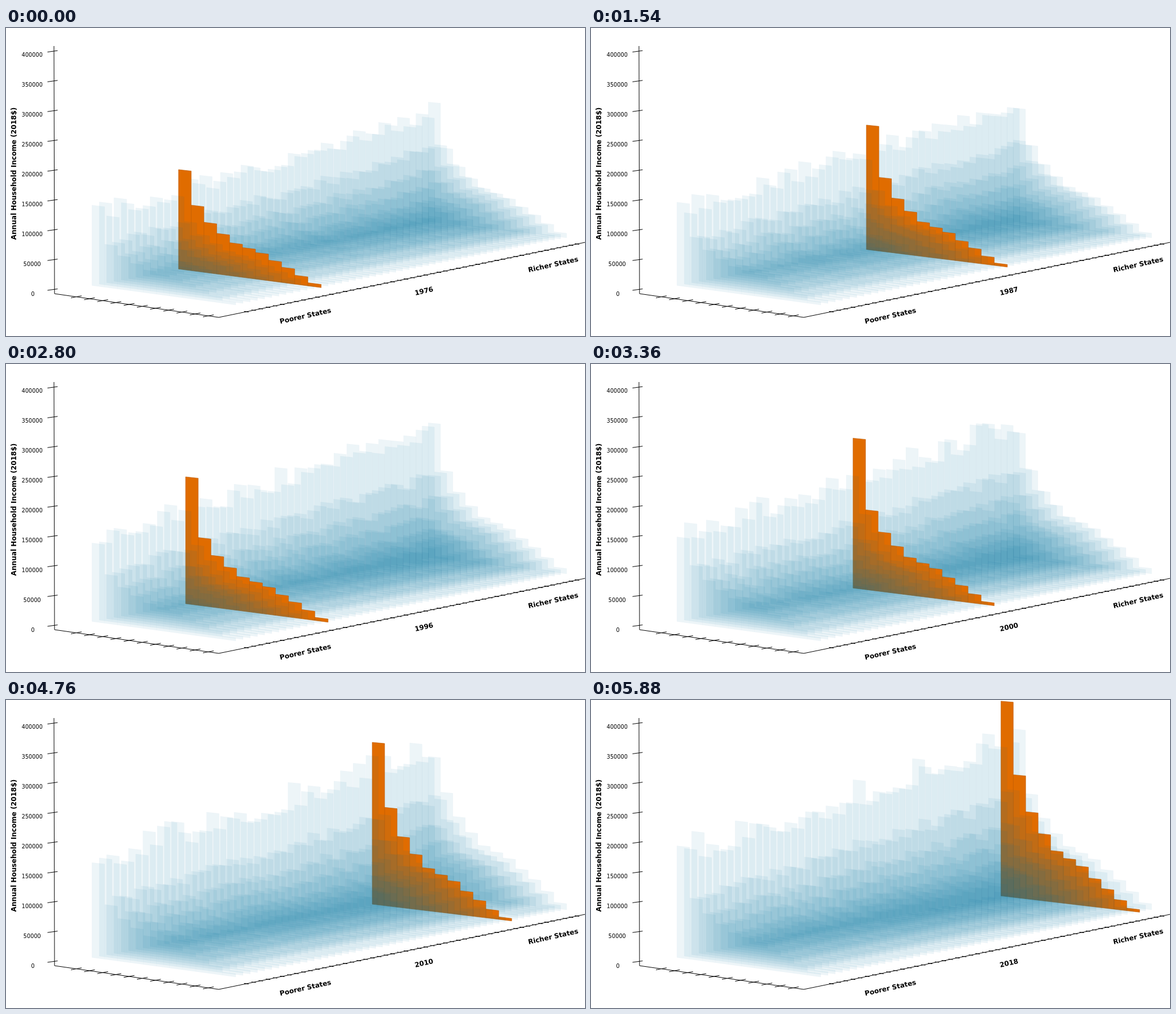
Write an HTML page that moves like this. It is 1026x546 px and loops after 6020 ms.

```html
<!DOCTYPE html>
<html lang="en">
<head>
<meta charset="utf-8">
<title>Household income by state</title>
<style>
html, body { margin: 0; width: 100%; height: 100%; overflow: hidden; background: #fff; }
svg { display: block; width: 100%; height: 100%; }
text { font-family: "DejaVu Sans", sans-serif; text-anchor: middle; fill: #000; }
.bold { font-weight: bold; font-size: 12px; }
.tick { font-size: 9.72px; }
.axis { stroke: #000; stroke-width: 1; fill: none; }
.state { fill: #00759f; fill-opacity: .069; stroke: #00759f; stroke-opacity: .04; stroke-width: .6; }
.pick { fill: #e06c00; stroke: #b95c08; stroke-width: .6; }
</style>
</head>
<body>
<svg id="stage" viewBox="0 0 1026 546" preserveAspectRatio="none"></svg>
<script>
const STEP = 140, YEARS = 43, STATES = 51, BARS = 11, FIRST = 1976;
const stage = document.getElementById('stage');

// Path of the highlighted state: rank, screen y of its tallest bar, height of its second bar.
const path = [
  { year: 0, rank: 12, top: 251, second: 116 },
  { year: 7, rank: 24, top: 189, second: 128 },
  { year: 15, rank: 30, top: 155, second: 133 },
  { year: 20, rank: 13, top: 200, second: 120 },
  { year: 27, rank: 34, top: 80, second: 157 },
  { year: 34, rank: 41, top: 75, second: 174 },
  { year: 42, rank: 48, top: 2, second: 217 }
];
// Falling income groups, relative to the second bar.
const shape = [1, .75, .6, .48, .43, .38, .29, .21, .12, .04];

const lerp = (a, b, t) => a + (b - a) * t;
function rand(a, b, c) {
  const v = Math.sin(a * 127.1 + b * 311.7 + c * 74.7 + 3.3) * 43758.5453;
  return v - Math.floor(v);
}

// Perspective: bar edge u, state rank k, height h.
const depth = (u, k) => 1 + .00198 * k - .025 * u / BARS;
function project(u, k, h) {
  const w = depth(u, k);
  return [(152.2 + 244.8 * u / BARS + 13.401 * k) / w,
          (456.5 + 22.2 * u / BARS - 1.586 * k - h) / w];
}
const point = (u, k, h) => project(u, k, h).map(v => v.toFixed(2)).join(' ');

function add(tag, attrs, text) {
  const el = document.createElementNS('http://www.w3.org/2000/svg', tag);
  for (const name in attrs) el.setAttribute(name, attrs[name]);
  if (text !== undefined) el.textContent = text;
  return stage.appendChild(el);
}
const axis = d => add('path', { class: 'axis', d });
const turned = (x, y, angle, text) => add('text', {
  class: 'bold', y: 4.4, transform: `translate(${x} ${y}) rotate(${angle})` }, text);

function drawAxes() {
  axis('M85 32L86 471L377 513L1026 380');
  for (let i = 0; i < 9; i++) {
    const y = 464 - i * 52.8;
    axis(`M73.5 ${y + 1}L91.5 ${y - 1.5}`);
    add('text', { class: 'tick', x: i ? 46.3 : 47.7, y: 474.5 - i * 52.9 }, i * 50000);
  }
  for (let i = 0; i < BARS; i++) {
    const x = 124.5 + i * 23.4, y = 471 + (x - 86) * .1443;
    axis(`M${x - 9.5} ${y + 1.8}L${x + 9.5} ${y - 1.8}`);
  }
  for (let k = 0; k < STATES; k++) {
    const x = 426 + 12.83 * k / (1 + .0019 * k), y = 513 - (x - 377) * .2049;
    axis(`M${x - 4} ${y - .6}l8 1.2`);
  }
  turned(530.5, 510, -12.4, 'Poorer States');
  turned(969.5, 419, -12.4, 'Richer States');
  turned(13.5, 258, -90, 'Annual Household Income (2018$)').style.fontSize = '12.1px';
}

// Income falls off a little faster the higher the power.
function heights(k, top, second, power) {
  const w = depth(0, k);
  return [project(0, k, 0)[1] - top, ...shape.map(v => second * v ** power)].map(h => h * w);
}

// Ordinary states rise with rank and over the years, with a few tall outliers.
function stateHeights(year, k) {
  const p = (year / (YEARS - 1)) ** 1.2;
  const outlier = (12 - 42 * rand(year, k, 1) ** 2) * (.7 + .6 * p);
  const top = lerp(332 - 3.6 * k, 278 - 4.2 * k, p) + outlier;
  const second = lerp(lerp(80, 112, p), lerp(138, 185, p), k / 50);
  return heights(k, top, second * lerp(.92, 1.08, rand(year, k, 2)), .88);
}

function pickAt(year) {
  let i = 0;
  while (i < path.length - 2 && path[i + 1].year <= year) i++;
  const a = path[i], b = path[i + 1], t = (year - a.year) / (b.year - a.year);
  const at = name => lerp(a[name], b[name], t);
  return { rank: Math.round(at('rank')), top: at('top'), second: at('second') };
}

function outline(k, hs) {
  let d = 'M' + point(0, k, 0);
  hs.forEach((h, u) => { d += 'L' + point(u, k, h) + 'L' + point(u + 1, k, h); });
  d += 'L' + point(BARS, k, 0) + 'Z';
  for (let u = 1; u < BARS; u++) d += 'M' + point(u, k, 0) + 'L' + point(u, k, hs[u]);
  return d;
}

// Richest states stand at the back.
const planes = [];
for (let k = STATES - 1; k >= 0; k--) planes[k] = add('path', {});
drawAxes();
const yearLabel = turned(740.5, 466, -12.4, FIRST);

function render(year) {
  const { rank, top, second } = pickAt(year);
  planes.forEach((plane, k) => {
    const chosen = k === rank;
    const hs = chosen ? heights(k, top, second, .86 + .007 * k) : stateHeights(year, k);
    plane.setAttribute('class', chosen ? 'pick' : 'state');
    plane.setAttribute('d', outline(k, hs));
  });
  yearLabel.textContent = FIRST + year;
}

let start, shown = 0;
render(0);
function tick(now) {
  if (start === undefined) start = now;
  const year = Math.floor((now - start) / STEP) % YEARS;
  if (year !== shown) render(shown = year);
  requestAnimationFrame(tick);
}
requestAnimationFrame(tick);
</script>
</body>
</html>
```
